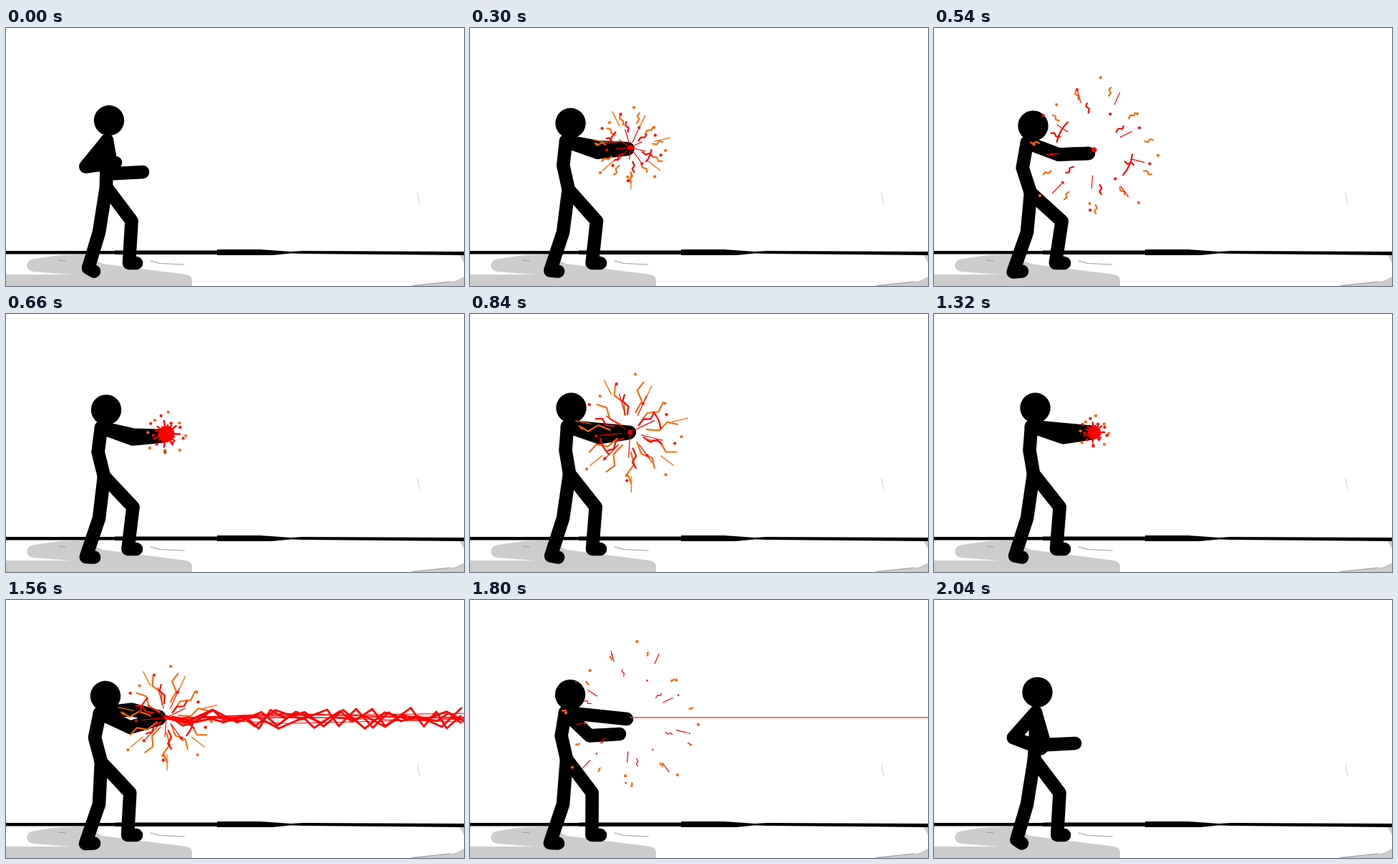
Write an HTML page with a canvas that moves like this. It is 640 by 360 pixels and loops after 2100 ms.

```html
<!DOCTYPE html>
<html lang="en">
<head>
<meta charset="utf-8">
<title>Energy blast</title>
<style>
html, body { margin: 0; height: 100%; overflow: hidden; background: #fff; }
canvas { display: block; }
</style>
</head>
<body>
<canvas id="stage" width="640" height="360"></canvas>
<script>
const ctx = document.getElementById('stage').getContext('2d');
const RED = '#f00', ORANGE = '#f60';
const LOOP = 2100, STEP = 60;

const mix = (a, b, k) => a.map ? a.map((v, i) => mix(v, b[i], k)) : a + (b - a) * k;
const polar = (r, a) => [r * Math.cos(a), r * Math.sin(a)];

function random(seed) {
  return () => (seed = (seed * 16807 + 11) % 2147483647) / 2147483647;
}

function line(points, color, width) {
  ctx.beginPath();
  points.forEach(p => ctx.lineTo(...p));
  ctx.strokeStyle = color;
  ctx.lineWidth = width;
  ctx.stroke();
}

function disc([x, y], r, color) {
  ctx.beginPath();
  ctx.arc(x, y, r, 0, 7);
  ctx.fillStyle = color;
  ctx.fill();
}

function shape(path, color) {
  ctx.fillStyle = color;
  ctx.fill(new Path2D(path));
}

function ground() {
  shape('M0 344H90L38 340Q29 338 29 331Q30 323 40 322L75 317L108 316L135 329L252 344Q260 346 260 352V360H0Z', '#ccc');
  shape('M634 317H640V328Z M565 360L628 353L640 347V360Z', '#ccc');
  line([[568, 359.5], [620, 354]], '#999', 1.2);
  line([[202, 325], [215, 328.5], [249, 330]], '#999', 1.2);
  line([[73, 324], [83, 325]], '#999', 1);
  line([[575, 230], [578, 245]], '#ccc', 1);
  shape('M0 311H152V310.5H295V309H355L398 312L415 311L640 312V317L415 315L398 314.5L372 317H295V316H152V315.5H0Z', '#000');
}

// Middle joint of a two-part limb; bend sets the side and amount
function joint(from, to, upper, lower, bend) {
  const dx = to[0] - from[0], dy = to[1] - from[1];
  const d = Math.hypot(dx, dy);
  const along = (upper ** 2 - lower ** 2 + d * d) / (2 * d);
  const off = bend * Math.sqrt(Math.max(0, upper ** 2 - along ** 2));
  return [from[0] + (dx * along - dy * off) / d, from[1] + (dy * along + dx * off) / d];
}

// Neck, hip, left hand, right hand, bend of the left elbow
const cocked = [[141, 157], [140, 222], [153, 188], [191, 201], 1];
const push = [[136, 157], [139, 223], [223, 165], [222, 166], 0];
const recoil = [[130, 160], [135, 230], [216, 175], [216, 175], 1];
const beaming = [[131, 158], [133, 226], [214, 163], [214, 166], -0.5];
const relax = [[133, 157], [135, 222], [219, 166], [209, 187], 0];
const ready = [[142, 157], [140, 222], [150, 207], [197, 200], 1];

const poses = [[0, cocked], [60, cocked], [180, push], [540, recoil], [780, push], [1380, push],
  [1500, beaming], [1620, beaming], [1800, relax], [2040, ready], [LOOP, cocked]];

function poseAt(t) {
  const i = poses.findIndex(p => p[0] > t);
  const [t0, a] = poses[i - 1], [t1, b] = poses[i];
  return mix(a, b, (t - t0) / (t1 - t0));
}

function figure([neck, hip, handA, handB, bend], filled) {
  const limb = (...points) => line(points, '#000', 18.6);
  const lean = 141 - neck[0];
  const [midX, midY] = mix(neck, hip, 0.5);
  const footF = [172 - lean * 0.2, 328];

  limb(neck, [midX - lean * 0.8, midY], hip);
  limb(hip, [130, 285], [115 - lean * 0.4, 335 + lean * 0.5], [123, 339.5]);
  limb(hip, joint(hip, footF, 59, 59, -1), footF, [182, 328]);
  limb(neck, joint(neck, handA, 47, 42, bend), handA);
  if (filled) ctx.fill();
  limb(neck, joint(neck, handB, 47, 42, 1), handB);
  disc([neck[0] + 3 + lean * 0.5, neck[1] - 28 + lean * 0.4], 21.2, '#000');
}

// Calls each(angle, reach, index) for sparks spread evenly round the centre
function ring(count, degrees, reach, spread, each) {
  for (let i = 0; i < count; i++) {
    each((degrees + i * 360 / count) * Math.PI / 180, reach + spread * Math.cos(i * 2.4), i);
  }
}

// A radial streak; a bend turns it into a zigzag
function streak(angle, outer, length, bend, color, width) {
  const inner = Math.max(0, outer - length);
  const side = bend * (outer - inner) / outer;
  line([
    polar(outer, angle),
    polar(mix(outer, inner, 0.3), angle + side),
    polar(mix(outer, inner, 0.6), angle - side),
    polar(inner, angle)
  ], color, width);
}

// s is the size of the burst: 0 closed, 1 fully open
function burst(s, mirrored) {
  const stretch = Math.exp(-(((s - 0.72) / 0.19) ** 2));
  const late = s > 0.97, open = s > 0.3;
  const wild = i => i % 2 ? 0.16 : -0.16;
  const redDot = late ? 1.2 : 2.1;

  if (open) {
    if (s < 0.9) ring(7, 89, 103, 8, (a, r) => streak(a, r * s, 22, 0, ORANGE, 1.3));
    ring(11, -75, 88, 8, (a, r, i) => streak(a, r * s, 45 * stretch, wild(i), ORANGE, 2.1));
    ring(6, -99, 62, 8, (a, r, i) => streak(a, r * s, 8 + 20 * stretch, wild(i), RED, late ? 1.2 : 2.2));
    ring(9, -66, 80, 19, (a, r) => streak(a, r * s * s, 13 + 18 * stretch, 0, RED, 1.2));
    if (!late) disc([0, 0], 3.5, RED);
  } else {
    disc([0, 0], 40 * s, RED);
    ring(18, 0, 52, 14, (a, r) => streak(a, r * s, 9, 0, RED, 2.4));
  }
  if (open && !late) {
    for (const a of [0.12, 3.35]) {
      ctx.beginPath();
      ctx.arc(0, 0, 57 * s, mirrored ? -a - 0.6 : a, mirrored ? -a : a + 0.6);
      ctx.strokeStyle = RED;
      ctx.lineWidth = 2.2;
      ctx.stroke();
    }
  }
  ring(8, -85, 94, 14, (a, r) => disc(polar(r * s, a), 2.1, ORANGE));
  ring(9, -106, 73, 20, (a, r) => disc(polar(r * s, a), redDot, RED));
}

function beam(t) {
  if (t < 1380 || t >= 1860) return;
  if (t >= 1740) return line([[224, 164], [640, 164]], '#ff3c32', 1.5);
  const rand = random(t + 7);
  const end = t < 1440 ? 440 : 650;
  const height = 15 * Math.min(1, (1740 - t) / 120);
  for (let i = 0; i < 4; i++) {
    const points = [[224, 165]];
    let side = i % 2 ? 1 : -1;
    for (let x = 234 + rand() * 20; x < end; x += 14 + rand() * 24) {
      points.push([x, 165 + side * height * rand()]);
      side = -side;
    }
    line(points, RED, 2.8);
  }
  for (let i = 0; i < 6; i++) {
    const y = () => 165 + height * (rand() - 0.5);
    line([[224, 165], [mix(224, end, 0.4), y()], [end, y()]], RED, 1.1);
  }
}

// Start and duration of each burst
const bursts = [[120, 460], [600, 360], [1260, 540]];

function draw(now) {
  const t = Math.floor(now % LOOP / STEP) * STEP;
  const pose = poseAt(t);
  ctx.clearRect(0, 0, 640, 360);
  ctx.lineCap = ctx.lineJoin = 'round';
  ground();
  figure(pose, t < 1400);
  beam(t);
  bursts.forEach(([start, duration], i) => {
    const u = (t - start) / duration;
    if (u <= 0 || u > 1) return;
    ctx.save();
    ctx.translate(224, mix(165, pose[2][1], 0.5));
    burst(u ** 0.7, i === 1);
    ctx.restore();
  });
}

const start = performance.now();
function tick() {
  draw(performance.now() - start);
  requestAnimationFrame(tick);
}
tick();
</script>
</body>
</html>
```
